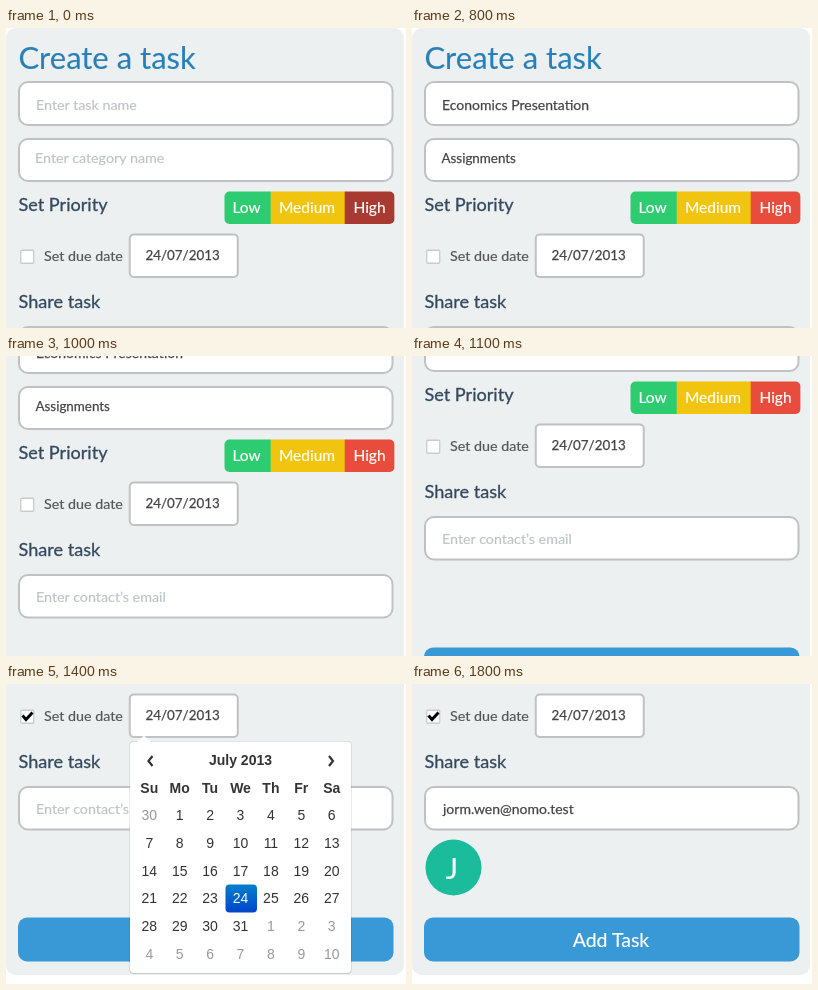
Recreate the animation shown at these times as an HTML page. Size 400 by 300 pixels, loop 2100 ms.

```html
<!DOCTYPE html>
<html lang="en">
<head>
<meta charset="utf-8">
<title>Create a task</title>
<style>
html, body { margin: 0; width: 100%; height: 100%; overflow: hidden; background: #fff; }
svg { display: block; width: 400px; height: 300px; font-family: Lato, "Open Sans", sans-serif; }
svg * { animation: 2.1s step-end infinite; }

.field { fill: #fff; stroke: #bfc1c2; stroke-width: 2; }
.title { font-size: 31px; fill: #2980b9; stroke: #2980b9; stroke-width: .15; }
.head { font-size: 18.1px; fill: #34495e; stroke: #34495e; stroke-width: .3; }
.hint { font-size: 14.3px; fill: #bdc3c7; stroke: #bdc3c7; stroke-width: .2; }
.value { font-size: 14px; fill: #444; stroke: #444; stroke-width: .25; }
.short { font-size: 13.4px; }
.label { font-size: 14.3px; fill: #555; stroke: #555; stroke-width: .2; }
.white { fill: #fff; stroke: #fff; stroke-width: .2; text-anchor: middle; }

.page { animation-name: scroll; }
.high { fill: #a93a32; animation-name: press; }
.on200 { animation-name: on200; }
.on300 { animation-name: on300; }
.on400 { animation-name: on400; }
.on600 { animation-name: on600; }
.on700 { animation-name: on700; }
.on1300 { animation-name: on1300; }
.on1700 { animation-name: on1700; }
.on1800 { animation-name: on1800; }
.off200 { animation-name: off200; }
.off600 { animation-name: off600; }
.off1700 { animation-name: off1700; }
.calendar { animation-name: popup; }

@keyframes scroll {
  0% { transform: translateY(0); }
  42.85% { transform: translateY(-40px); }
  47.61% { transform: translateY(-80px); }
  52.38% { transform: translateY(-138px); }
  57.14%, 100% { transform: translateY(-196px); }
}
@keyframes press { 0% { fill: #a93a32; } 38.09%, 100% { fill: #e74c3c; } }
@keyframes on200 { 0% { visibility: hidden; } 9.52%, 100% { visibility: visible; } }
@keyframes on300 { 0% { visibility: hidden; } 14.28%, 100% { visibility: visible; } }
@keyframes on400 { 0% { visibility: hidden; } 19.04%, 100% { visibility: visible; } }
@keyframes on600 { 0% { visibility: hidden; } 28.57%, 100% { visibility: visible; } }
@keyframes on700 { 0% { visibility: hidden; } 33.33%, 100% { visibility: visible; } }
@keyframes on1300 { 0% { visibility: hidden; } 61.9%, 100% { visibility: visible; } }
@keyframes on1700 { 0% { visibility: hidden; } 80.95%, 100% { visibility: visible; } }
@keyframes on1800 { 0% { visibility: hidden; } 85.71%, 100% { visibility: visible; } }
@keyframes off200 { 0% { visibility: visible; } 9.52%, 100% { visibility: hidden; } }
@keyframes off600 { 0% { visibility: visible; } 28.57%, 100% { visibility: hidden; } }
@keyframes off1700 { 0% { visibility: visible; } 80.95%, 100% { visibility: hidden; } }
@keyframes popup {
  0% { visibility: hidden; }
  66.66% { visibility: visible; }
  76.19%, 100% { visibility: hidden; }
}

.calendar { font: 14px "Liberation Sans", Arial, sans-serif; fill: #333; text-anchor: middle; }
.calendar .bold { font-weight: bold; }
.calendar .muted { fill: #999; }
.calendar .active { fill: #fff; }
.arrow { fill: none; stroke: #333; stroke-width: 2.2; }
</style>
</head>
<body>
<svg viewBox="0 0 400 300">
  <defs>
    <linearGradient id="blue" x1="0" y1="0" x2="0" y2="1">
      <stop offset="0" stop-color="#0080cc"/>
      <stop offset="1" stop-color="#0044cc"/>
    </linearGradient>
    <clipPath id="pill"><rect x="218.5" y="163.5" width="170" height="32.5" rx="5"/></clipPath>
  </defs>
  <g class="page">
    <rect width="398" height="487" rx="10" fill="#ecf0f1"/>
    <text class="title" x="12.5" y="41">Create a task</text>

    <rect class="field" x="13" y="54" width="373.5" height="43" rx="9"/>
    <text class="hint off200" x="30" y="82">Enter task name</text>
    <text class="value" x="30" y="82"><tspan class="on200">Econom</tspan><tspan class="on300">ics Pres</tspan><tspan class="on400">entation</tspan></text>

    <rect class="field" x="13" y="111" width="373.5" height="42" rx="9"/>
    <text class="hint off600" x="29" y="135">Enter category name</text>
    <text class="value short" x="29.5" y="135"><tspan class="on600">Assig</tspan><tspan class="on700">nments</tspan></text>

    <text class="head" x="12.5" y="183">Set Priority</text>
    <g clip-path="url(#pill)">
      <rect x="218" y="163" width="47" height="33" fill="#2ecc71"/>
      <rect x="264.7" y="163" width="75" height="33" fill="#f1c40f"/>
      <rect class="high" x="338.7" y="163" width="50" height="33"/>
    </g>
    <g class="white" font-size="15.5">
      <text x="240.5" y="185">Low</text>
      <text x="301" y="185">Medium</text>
      <text x="363.5" y="185">High</text>
    </g>

    <rect x="14.75" y="222.25" width="13" height="13" rx="1" fill="#fff" stroke="#c9cccd" stroke-width="1.3"/>
    <path class="on1300" d="M16.5 227.500l3.500 4 6.500-7" fill="none" stroke="#000" stroke-width="3"/>
    <text class="label" x="38" y="233">Set due date</text>
    <rect class="field" x="123.750" y="206.500" width="108" height="42.500" rx="4"/>
    <text class="value short" x="139.500" y="232">24/07/2013</text>

    <text class="head" x="12.5" y="280">Share task</text>
    <rect class="field" x="13" y="299" width="373.5" height="42.5" rx="9"/>
    <text class="hint off1700" x="30" y="326">Enter contact’s email</text>
    <text class="value" x="31" y="326"><tspan class="on1700">jorm.wen@</tspan><tspan class="on1800">nomo.test</tspan></text>

    <g class="on1800">
      <circle cx="41.5" cy="379.5" r="28" fill="#1abc9c"/>
      <text class="white" x="40" y="390.5" font-size="29">J</text>
    </g>

    <rect x="12" y="429.5" width="375.5" height="44" rx="9" fill="#3998d6"/>
    <text class="white" x="199" y="459" font-size="19.5">Add Task</text>

    <g class="calendar">
      <rect x="123.5" y="253" width="222" height="233" rx="4" fill="#000" opacity=".16"/>
      <path d="M131 254.5l7-7 7 7z" fill="#fff"/>
      <rect x="124" y="253.5" width="221" height="231.5" rx="4" fill="#fff"/>
      <path class="arrow" d="M146.5 268l-4 5 4 5M323 268l4 5-4 5"/>
      <text class="bold" x="234.5" y="277">July 2013</text>
      <rect x="219.5" y="396.5" width="31.5" height="28" rx="4" fill="url(#blue)"/>
      <g id="days"></g>
    </g>
  </g>
</svg>
<script>
const days = document.getElementById('days');

function cell(col, y, text, style) {
  const node = document.createElementNS('http://www.w3.org/2000/svg', 'text');
  node.setAttribute('x', 143.3 + col * 30.4);
  node.setAttribute('y', y);
  node.setAttribute('class', style);
  node.textContent = text;
  days.append(node);
}

['Su', 'Mo', 'Tu', 'We', 'Th', 'Fr', 'Sa'].forEach((name, i) => cell(i, 305, name, 'bold'));

for (let i = 0; i < 42; i++) {
  const date = new Date(2013, 5, 30 + i);
  const day = date.getDate();
  const style = date.getMonth() !== 6 ? 'muted' : day === 24 ? 'active' : 'day';
  cell(i % 7, 332.3 + Math.floor(i / 7) * 27.7, day, style);
}
</script>
</body>
</html>
```
